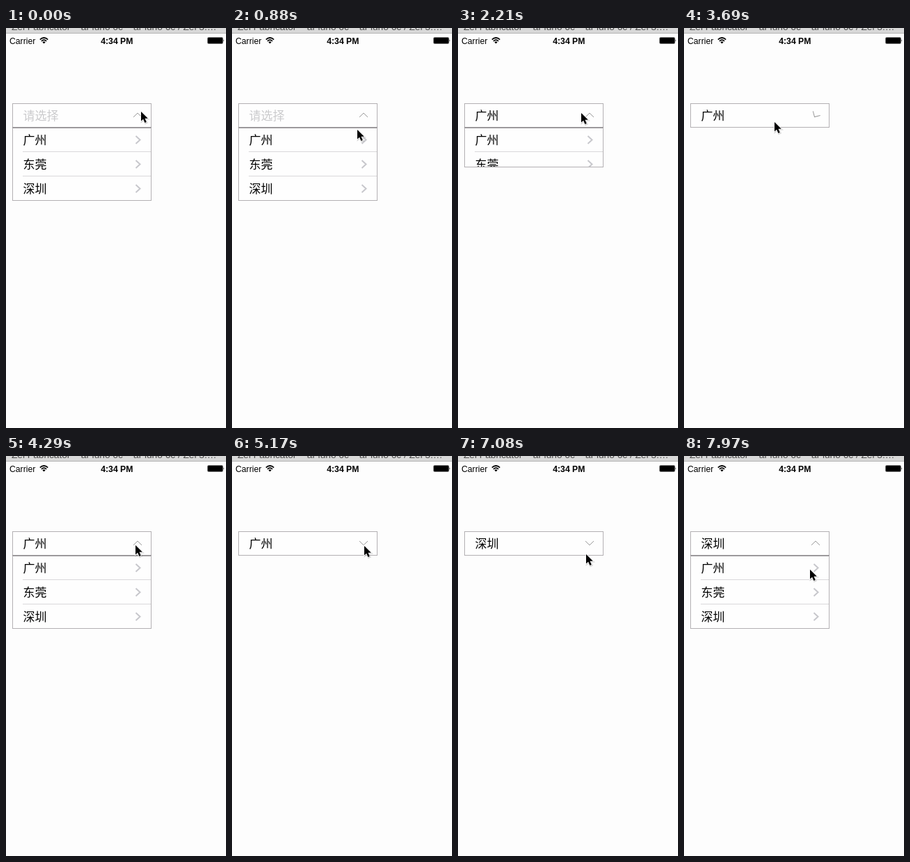
An HTML page that plays this animation: 316x574 px, repeating every 8 s.

```html
<!DOCTYPE html>
<html lang="zh">
<head>
<meta charset="utf-8">
<title>Dropdown</title>
<style>
  html, body { margin: 0; width: 100%; height: 100%; overflow: hidden; background: #fdfdfd; }
  svg { display: block; width: 316px; height: 574px; }
  .ui { font-family: "Liberation Sans", Arial, sans-serif; }
  .cjk { font: 300 17px "Noto Sans CJK SC", "Noto Sans CJK", sans-serif; }
  .frame { fill: #fefefe; stroke: #b3b0b3; }
  .line { fill: none; }
</style>
</head>
<body>
<svg viewBox="0 0 316 574">
  <defs>
    <clipPath id="clip"><rect id="clipBox" x="9" y="142" width="200" height="106"/></clipPath>
  </defs>
  <rect width="316" height="574" fill="#fdfdfd"/>

  <rect width="316" height="7" fill="#d8d8d8"/>
  <rect y="7" width="316" height="1" fill="#b4b4b4"/>
  <text class="ui" x="8" y="2.5" font-size="13.7" fill="#4c4c4c">Zel Fabricator – aFluno 6c – aFluno 6c / Zel 3.…</text>

  <g class="ui" font-size="12.2">
    <text x="5" y="22.5">Carrier</text>
    <text x="159.3" y="22.5" font-weight="bold" text-anchor="middle">4:34 PM</text>
  </g>
  <g class="line" stroke="#000" stroke-width="1.7">
    <path d="M48.8 16.6Q54.5 11.4 60.2 16.6"/>
    <path d="M50.9 18.9Q54.5 15.5 58.1 18.9"/>
  </g>
  <path d="M52.4 20.2Q54.5 18.5 56.6 20.2L54.5 22.4Z"/>
  <rect x="289.5" y="13.5" width="22" height="9" rx="1.5" fill="none" stroke="#777"/>
  <rect x="290" y="14" width="21" height="8" rx="1"/>
  <path d="M312.5 16.2Q314 18 312.5 19.8Z"/>

  <rect class="frame" x="9.5" y="108.5" width="199" height="34"/>
  <text id="title" class="cjk" x="24.5" y="131.5"></text>
  <path id="arrow" class="line" d="M-6 3L0 -3L6 3" stroke="#9a9a9a"/>

  <g id="list">
    <rect id="box" class="frame" x="9.5" y="143"  width="199"/>
    <g id="rows" clip-path="url(#clip)"></g>
    <path d="M9 143H209" stroke="#8f8c8f" stroke-width="1.4"/>
    <path id="edge" class="line" stroke="#b3b0b3"/>
  </g>

  <g id="cursor">
    <path d="M.6 1.2V14.4L3.6 11.6L6 17L8.6 15.8L6.2 10.6H10.4Z" fill="#000" opacity=".18" stroke="#000" stroke-width="2"/>
    <path d="M0 0V13.6L3.1 10.7L5.4 16L7.8 15L5.5 9.8H9.8Z" stroke="#fff" stroke-width="1.6" paint-order="stroke"/>
  </g>
</svg>
<script>
const LOOP = 8000, STEP = 147.6, TOP = 142.5, ROW = 35;
const cities = ["广州", "东莞", "深圳"];
const $ = id => document.getElementById(id);
const set = (el, attrs) => { for (const k in attrs) el.setAttribute(k, attrs[k]); };

// Each toggle starts at a step; pick is the chosen row, if any.
const toggles = [
  { at: -9, open: true },
  { at: 8, pick: 0 }, { at: 14, open: true },
  { at: 21 }, { at: 25, open: true },
  { at: 31 }, { at: 37, open: true },
  { at: 43, pick: 2 }, { at: 51, open: true }
];
const opening = { angle: [210, 360, 360], height: [0, 57, 105] };
const closing = { angle: [105, 180, 180], height: [105, 43, 0] };
const glow = [1, 0.33, 0];

// Pointer path: step, x, y
const path = [
  [2, 194, 120], [5, 184, 140], [8, 171, 158], [10, 171, 158], [13, 177, 122],
  [16, 177, 122], [20, 130, 135], [26, 130, 135], [29, 186, 128], [32, 187, 128],
  [35, 190, 129], [36, 190, 129], [38, 205, 200], [41, 178, 228], [44, 178, 228],
  [49, 186, 119], [51, 186, 120], [54, 181, 163]
];

const rows = cities.map((name, i) => {
  const y = 143 + i * ROW;
  $("rows").insertAdjacentHTML("beforeend", `
    ${i < 2 ? `<path d="M24 ${y + 34.5}H208" stroke="#d9d8da"/>` : ""}
    <rect x="10" y="${y - (i ? 1 : 0)}" width="198" height="35" fill="#d9d9d9"/>
    <text class="cjk" x="24.5" y="${y + 23.5}">${name}</text>
    <path class="line" d="M186.5 ${y + 12}l6 5.5l-6 5.5" stroke="#c7c7cc" stroke-width="2"/>`);
  return $("rows").querySelectorAll("rect")[i];
});

function pointerAt(n) {
  const i = path.findIndex(p => p[0] >= n);
  if (i < 0) return path[path.length - 1].slice(1);
  if (i === 0) return path[0].slice(1);
  const a = path[i - 1], b = path[i];
  const u = (n - a[0]) / (b[0] - a[0]);
  return [1, 2].map(k => a[k] + (b[k] - a[k]) * u);
}

function draw(time) {
  const n = Math.floor((time % LOOP + 9) / STEP);
  const past = toggles.filter(t => t.at <= n);
  const now = past[past.length - 1];
  const k = Math.min(n - now.at, 2);
  const move = now.open ? opening : closing;
  const h = move.height[k];

  const picked = past.filter(t => t.pick !== undefined).pop();
  $("title").textContent = picked ? cities[picked.pick] : "请选择";
  set($("title"), { fill: picked ? "#000" : "#cbcbcd" });
  set($("arrow"), { transform: `translate(189 125) rotate(${move.angle[k]})` });

  set($("list"), { display: h ? "inline" : "none" });
  set($("box"), { height: Math.max(h - 0.5, 0) });
  set($("clipBox"), { height: h + 1 });
  set($("edge"), { d: `M9.5 143V${TOP + h}H208.5V143` });
  rows.forEach((r, i) => set(r, { opacity: now.pick === i ? glow[k] : 0 }));

  const [x, y] = pointerAt(n);
  set($("cursor"), { transform: `translate(${Math.round(x)} ${Math.round(y)})` });
}

function tick() {
  draw(performance.now());
  requestAnimationFrame(tick);
}
tick();
</script>
</body>
</html>
```
